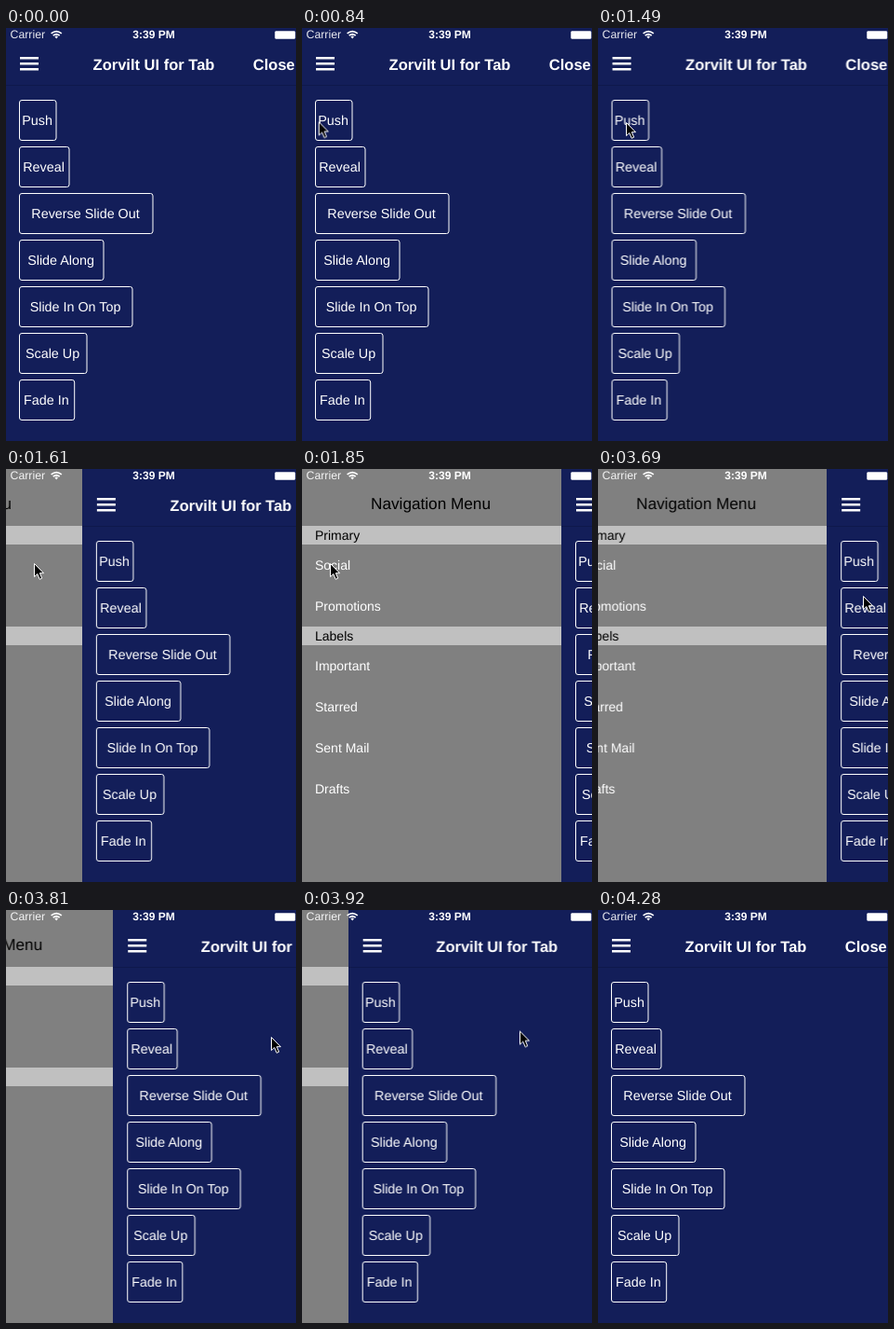
An HTML page that plays this animation: 312 by 443 pixels, repeating every 5650 ms.

```html
<!DOCTYPE html>
<html lang="en">
<head>
<meta charset="utf-8">
<title>Side drawer</title>
<style>
  html, body { margin: 0; width: 100%; height: 100%; overflow: hidden; background: #808080; }
  svg { display: block; width: 312px; height: 443px; }
  text { font: 14px "Liberation Sans", Arial, sans-serif; fill: #fff; text-rendering: geometricPrecision; }
  .mid { text-anchor: middle; }
  .bar { font-size: 16.5px; font-weight: bold; }
  .head { fill: #000; }
  .title { font-size: 17.2px; fill: #000; }
  .button { font-size: 14.35px; }
  .box { fill: none; stroke: #fff; }
  .status { font-size: 12.3px; }
  .clock { font-size: 12px; font-weight: bold; }
</style>
</head>
<body>
<svg viewBox="0 0 312 443">
  <rect width="312" height="443" fill="#808080"/>
  <g id="menu">
    <text class="title mid" x="138.5" y="43">Navigation Menu</text>
  </g>
  <g id="panel">
    <rect x="-1" width="320" height="443" fill="#131e59"/>
    <rect x="-1" y="61" width="320" height="1" fill="#0f184b"/>
    <path d="M15 32.2H35M15 38.2H35M15 44.2H35" stroke="#fff" stroke-width="2.5"/>
    <text class="bar mid" x="159" y="45">Zorvilt UI for Tab</text>
    <text class="bar" x="265.8" y="45">Close</text>
  </g>
  <g id="status">
    <text class="status" x="4.5" y="11.2" opacity=".9">Carrier</text>
    <g fill="none" stroke="#fff" stroke-width="1.7">
      <path d="M48.6 5.9Q54.2 1.2 59.8 5.9M50.7 8.2Q54.2 5.3 57.7 8.2"/>
      <path d="M52.4 9.2Q54.2 8 56 9.2L54.2 11.4Z" fill="#fff" stroke="none"/>
    </g>
    <text class="clock mid" x="159" y="11.2">3:39 PM</text>
    <rect x="289.5" y="3.5" width="21.5" height="8" rx="1" fill="#fff" stroke="#fff" stroke-opacity=".5"/>
  </g>
  <path id="cursor" d="M.5 .5V14.6L3.8 11.6L6.2 17.3L8.7 16.2L6.3 10.7H10.5Z"
        fill="#000" stroke="#fff" stroke-linejoin="round"/>
</svg>
<script>
const LOOP = 5650, DRAWER = 280, SLIDE = 355;
const $ = id => document.getElementById(id);

function add(parent, tag, attrs, text = '') {
  const el = document.createElementNS('http://www.w3.org/2000/svg', tag);
  for (const name in attrs) el.setAttribute(name, attrs[name]);
  el.textContent = text;
  parent.append(el);
}

const buttons = [['Push', 39.5], ['Reveal', 53.5], ['Reverse Slide Out', 143.5], ['Slide Along', 90.5],
  ['Slide In On Top', 121.5], ['Scale Up', 72.5], ['Fade In', 59.2]];
buttons.forEach(([label, width], i) => {
  const y = 77.5 + i * 50;
  add($('panel'), 'rect', { class: 'box', x: 14.5, y, width, height: 43, rx: 2.5 });
  add($('panel'), 'text', { class: 'button mid', x: 13.8 + width / 2, y: y + 26.5 }, label);
});

const sections = [[61, 'Primary', 'Social', 'Promotions'],
  [169, 'Labels', 'Important', 'Starred', 'Sent Mail', 'Drafts']];
for (const [y, heading, ...items] of sections) {
  add($('menu'), 'rect', { y, width: DRAWER, height: 20, fill: '#c0c0c0' });
  add($('menu'), 'text', { class: 'head', x: 14, y: y + 15 }, heading);
  items.forEach((item, i) => add($('menu'), 'text', { x: 14, y: y + 47 + i * 44 }, item));
}

const clamp = p => Math.min(1, Math.max(0, p));
const easeInOut = p => (1 - Math.cos(Math.PI * clamp(p))) / 2;
const mix = (a, b, p) => a + (b - a) * p;

// Evenly spaced held poses: [time, x, y]
function poses(first, last, count, pose) {
  return Array.from({ length: count }, (_, i) => {
    const time = first + (last - first) * i / (count - 1);
    return [time, ...pose(i + 1, time)];
  });
}

const path = (from, to, ease) => k => {
  const p = ease(k);
  return [mix(from[0], to[0], p), mix(from[1], to[1], p)];
};

function play(el, steps, dx = 0) {
  const frames = [...steps, [LOOP, ...steps[0].slice(1)]].map(([time, x, y]) => ({
    offset: time / LOOP,
    transform: `translate(${x + dx}px, ${y}px)`,
    easing: 'step-end'
  }));
  el.animate(frames, { duration: LOOP, iterations: Infinity });
}

const slide = [
  [0, 0, 0],
  ...poses(1490, 1850, 7, (k, t) => [DRAWER * easeInOut((t - 1480) / SLIDE), 0]),
  ...poses(3690, 4220, 10, (k, t) => [DRAWER * (1 - easeInOut((t - 3611) / SLIDE)), 0])
];
play($('panel'), slide);
play($('menu'), slide, -DRAWER);

const hidden = [-40, 99], rest = [30, 101], edge = [285, 136];
play($('cursor'), [
  [0, ...hidden],
  ...poses(660, 1070, 8, path([-12, 99], rest, k => Math.sin(k / 8 * Math.PI / 2))),
  ...poses(2260, 2860, 11, path(rest, edge, k => easeInOut(k / 10.4))),
  ...poses(3860, 4220, 7, path(edge, [25, 103], k => (k / 7) ** 1.3)),
  [4280, ...hidden]
]);
</script>
</body>
</html>
```
